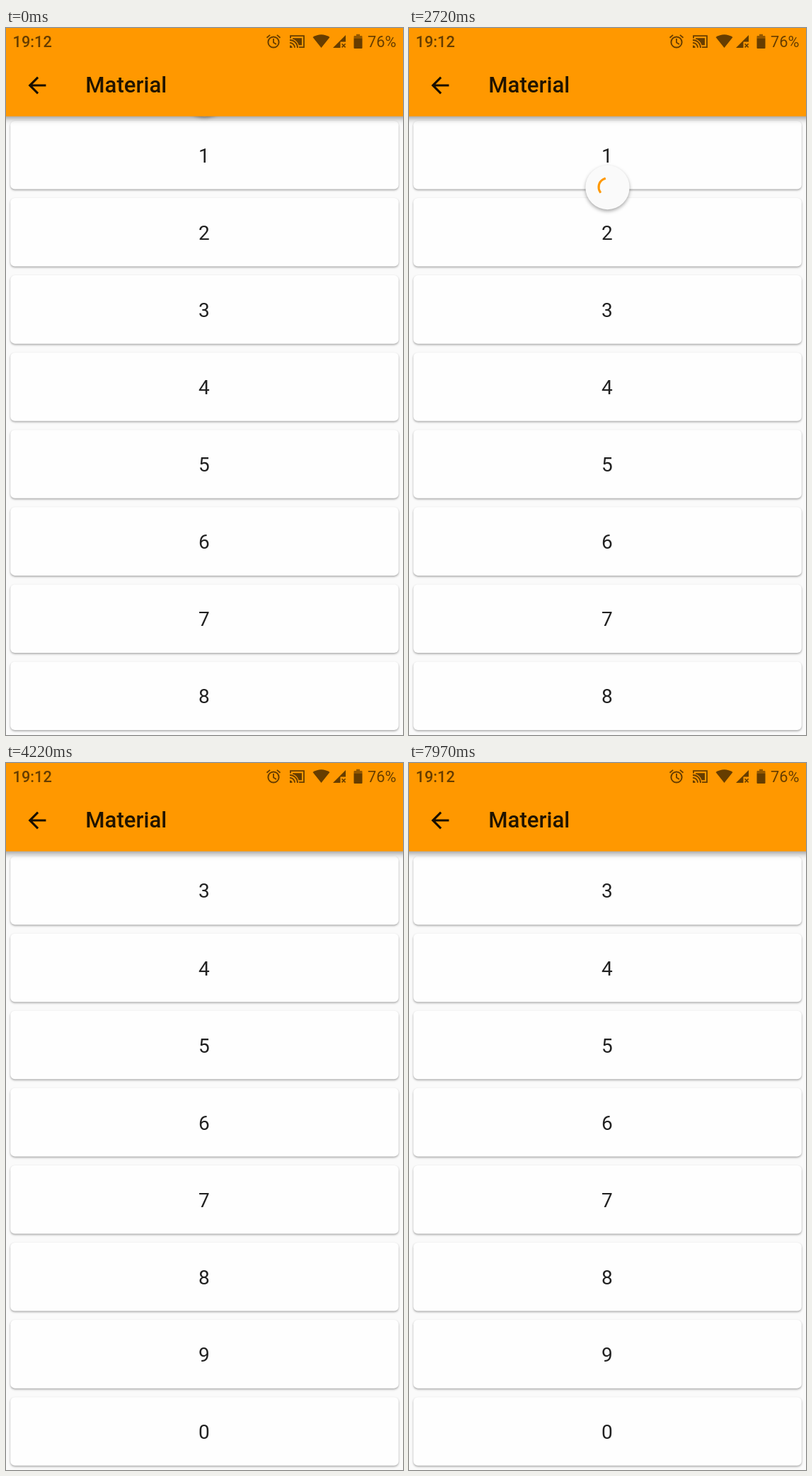
Recreate the animation shown at these times as an HTML page with a canvas. Size 561 by 998 pixels, loop 8010 ms.

```html
<!DOCTYPE html>
<html lang="en">
<head>
<meta charset="utf-8">
<title>Material</title>
<style>
html, body { margin: 0; width: 100%; height: 100%; overflow: hidden; background: #fafafa; }
canvas { display: block; width: 561px; height: 998px; }
</style>
</head>
<body>
<canvas id="stage" width="561" height="998"></canvas>
<script>
const ctx = document.getElementById('stage').getContext('2d');
const W = 561, H = 998, LOOP = 8010;
const DP = W / 360;
const BAR = 80 * DP, PITCH = 70 * DP, MID = W / 2;
const ORANGE = '#ff9800', PAPER = '#fafafa', FADED = 'rgba(0,0,0,.6)';
const FONT = 'Roboto, "Liberation Sans", sans-serif';
const ARROW = new Path2D('M20 11H7.83l5.59-5.59L12 4l-8 8 8 8 1.41-1.41L7.83 13H20v-2z');

const clamp = v => Math.min(1, Math.max(0, v));
const span = (t, a, b) => clamp((t - a) / (b - a));
const mix = (a, b, u) => a + (b - a) * u;
const easeOut = u => 1 - (1 - u) * (1 - u);

// cubic-bezier(.4, 0, .2, 1)
function standard(x) {
  x = clamp(x);
  let lo = 0, hi = 1;
  for (let i = 0; i < 20; i++) {
    const s = (lo + hi) / 2, r = 1 - s;
    if (1.2 * s * r * r + 0.6 * s * s * r + s * s * s < x) lo = s; else hi = s;
  }
  return 3 * lo * lo - 2 * lo * lo * lo;
}

function shadow(alpha, blur, dy) {
  ctx.shadowColor = `rgba(0,0,0,${alpha})`;
  ctx.shadowBlur = blur;
  ctx.shadowOffsetY = dy;
}

function text(str, x, y, size, weight, color, align) {
  ctx.font = `${weight} ${size}px ${FONT}`;
  ctx.textAlign = align;
  ctx.fillStyle = color;
  ctx.fillText(str, x, y);
}

function fillPath(d) { ctx.fill(new Path2D(d)); }
function strokePath(d, width) {
  ctx.lineWidth = width;
  ctx.stroke(new Path2D(d));
}

function drawList(offset) {
  for (let i = 0; i < 10; i++) {
    const y = BAR + i * PITCH - offset;
    if (y > H || y + PITCH < BAR) continue;
    ctx.save();
    shadow(0.34, 3, 1.5);
    ctx.fillStyle = '#fefefe';
    ctx.beginPath();
    ctx.roundRect(4 * DP, y + 4 * DP, W - 8 * DP, 62 * DP, 4 * DP);
    ctx.fill();
    ctx.restore();
    text((i + 1) % 10, MID - 0.7, y + PITCH / 2 + 10.6, 18 * DP, 400, 'rgba(0,0,0,.87)', 'center');
  }
}

// phase counts spinner turns, one per second
function drawSpinner(y, phase, scale) {
  if (scale <= 0) return;
  ctx.save();
  ctx.translate(MID, y);
  ctx.scale(scale, scale);
  ctx.save();
  shadow(0.34, 5, 2.5);
  ctx.fillStyle = PAPER;
  ctx.beginPath();
  ctx.arc(0, 0, 20 * DP, 0, 7);
  ctx.fill();
  ctx.restore();
  const step = Math.floor(phase), p = phase - step;
  const head = standard(p * 2), tail = standard(p * 2 - 1);
  const start = Math.PI * (-0.5 + 1.5 * tail + 1.7 * p - 0.8 * step);
  const sweep = Math.max(1.5 * Math.PI * (head - tail), 0.001);
  ctx.strokeStyle = ORANGE;
  ctx.lineWidth = 2 * DP;
  ctx.lineCap = 'square';
  ctx.beginPath();
  ctx.arc(0, -0.5, 8 * DP, start, start + sweep);
  ctx.stroke();
  ctx.restore();
}

function drawStatus() {
  text('19:12', 9.5, 27, 14 * DP, 500, FADED, 'left');
  text('76%', 551.5, 27, 14 * DP, 400, FADED, 'right');
  ctx.strokeStyle = ctx.fillStyle = FADED;

  // alarm
  ctx.beginPath();
  ctx.arc(378, 20, 7.6, 0, 7);
  ctx.lineWidth = 2;
  ctx.stroke();
  strokePath('M378 15v5.5l4 2.5M368.5 13.8l4.6-3.9M387.5 13.8l-4.6-3.9', 1.8);

  // cast
  strokePath('M402 14.5V11.2H421V27.2H414M401 20.8a7 7 0 0 1 7 7M401 17a11 11 0 0 1 11 11', 1.8);
  fillPath('M401 24.4a3.6 3.6 0 0 1 3.6 3.6H401zM405 14.2H418V24.2H413.6A13 13 0 0 0 405 15.6z');

  // wifi, signal
  fillPath('M445.5 28L433.5 13Q445.5 5.5 457.5 13z');
  fillPath('M462 28L480 10V19.5H472.5V28z');
  strokePath('M474.6 22.2l5 5.2M479.6 22.2l-5 5.2', 1.6);

  // battery
  fillPath('M491.5 14.5H503.5V28a1 1 0 0 1-1 1H492.5a1 1 0 0 1-1-1z');
  ctx.fillStyle = 'rgba(0,0,0,.42)';
  fillPath('M491.5 14.5V12a1 1 0 0 1 1-1H495V8.8H500V11H502.5a1 1 0 0 1 1 1V14.5z');
}

function drawBar() {
  ctx.save();
  shadow(0.38, 8, 3);
  ctx.fillStyle = ORANGE;
  ctx.fillRect(-20, -20, W + 40, BAR + 20);
  ctx.restore();
  drawStatus();
  ctx.save();
  ctx.translate(44 - 12 * DP, 81 - 12 * DP);
  ctx.scale(DP, DP);
  ctx.fillStyle = 'rgba(0,0,0,.9)';
  ctx.fill(ARROW);
  ctx.restore();
  text('Material', 112.3, 91.3, 20 * DP, 500, 'rgba(0,0,0,.87)', 'left');
}

function scrollAt(t) {
  const u = span(t, 3625, 3910);
  return (10 * PITCH - (H - BAR)) * (1 - Math.pow(1 - u * u, 3.56));
}

function header(t) {
  if (t > 3450) return;
  const pull = easeOut(span(t, 0, 1000));
  const phase = t < 1395 ? Math.max(0.375 * pull, (t - 1020) / 1000) : (t - 1020) / 1000;
  drawSpinner(mix(93, 225, pull), phase, 1 - span(t, 3250, 3450));
}

function footer(t) {
  if (t < 4430 || t > 7390) return;
  const rise = easeOut(span(t, 4430, 4800));
  drawSpinner(mix(1032, 926.5, rise), Math.max(0, (t - 5065) / 1000), 1 - span(t, 7190, 7390));
}

function draw(t) {
  ctx.fillStyle = PAPER;
  ctx.fillRect(0, 0, W, H);
  drawList(scrollAt(t));
  header(t);
  footer(t);
  drawBar();
}

const begin = performance.now();
function tick() {
  draw((performance.now() - begin) % LOOP);
  requestAnimationFrame(tick);
}
tick();
</script>
</body>
</html>
```
